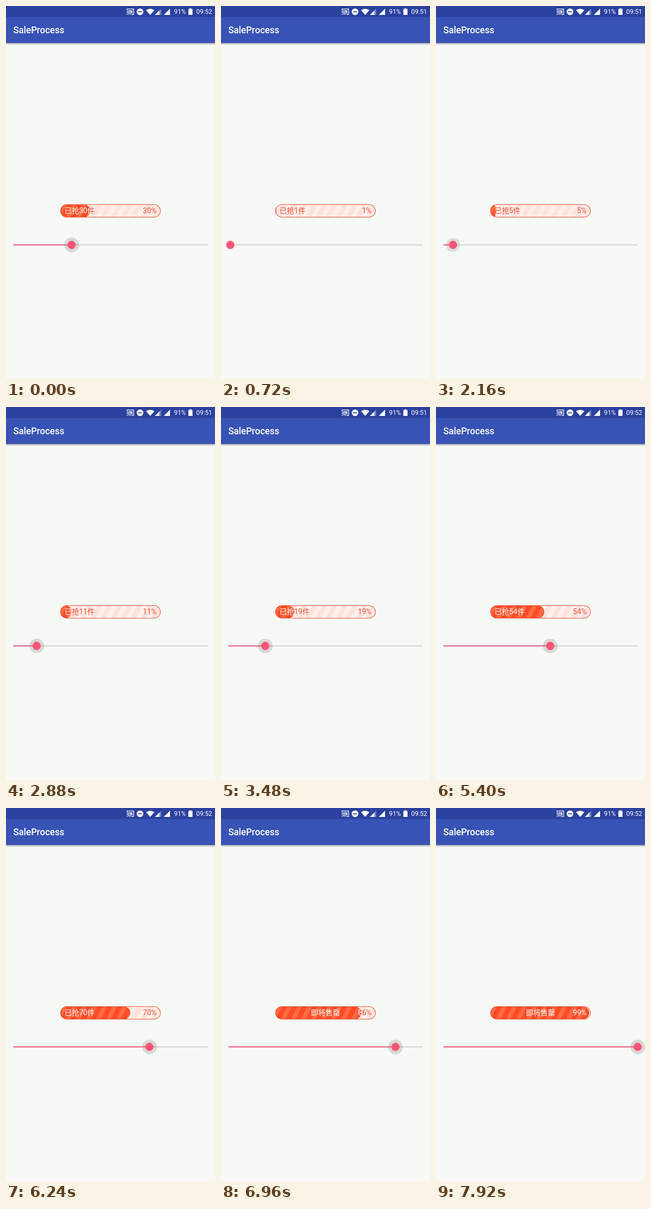
Write an HTML page with a canvas that moves like this. It is 400 px wide and 711 px high and loops after 8000 ms.

```html
<!DOCTYPE html>
<html lang="zh-CN">
<head>
<meta charset="utf-8">
<title>SaleProcess</title>
<style>
html, body { margin: 0; width: 100%; height: 100%; overflow: hidden; background: #f7f9f7; }
canvas { display: block; }
</style>
</head>
<body>
<canvas id="stage" width="400" height="711"></canvas>
<script>
const ctx = document.getElementById('stage').getContext('2d');
const LOOP = 8000, STEP = 120;
const FONT = 'Roboto, "Noto Sans CJK SC", "Noto Sans CJK", sans-serif';
const STATUS = '#2b419f', RED = '#ee5136', PINK = '#ff5378';
const BAR = { x: 104, y: 378, w: 192, h: 25 };
const TRACK = { x: 14, y: 455.4, w: 372 };

// [time in ms, percent] of the finger dragging the slider
const DRAG = [[1800, 1], [2160, 5], [2520, 8], [3360, 17], [3480, 19], [4200, 30], [4320, 32.6],
  [5400, 54.6], [6720, 79], [6960, 86], [7560, 96], [7920, 99.6]];

const clamp = (v, lo = 0, hi = 1) => Math.min(hi, Math.max(lo, v));

function percentAt(t) {
  if (t < 720) return 30;
  if (t <= DRAG[0][0]) return DRAG[0][1];
  const i = DRAG.findIndex(([time]) => time >= t);
  const [t0, p0] = DRAG[i - 1], [t1, p1] = DRAG[i];
  return p0 + (p1 - p0) * (t - t0) / (t1 - t0);
}

function rect(x, y, w, h, color) {
  ctx.fillStyle = color;
  ctx.fillRect(x, y, w, h);
}

function disc(x, y, r, color) {
  ctx.fillStyle = color;
  ctx.beginPath();
  ctx.arc(x, y, r, 0, 7);
  ctx.fill();
}

function shape(path, color = '#fff') {
  ctx.fillStyle = color;
  ctx.fill(new Path2D(path));
}

function text(str, x, y, size, color, align = 'left', weight = 400) {
  ctx.font = `${weight} ${size}px ${FONT}`;
  ctx.textAlign = align;
  ctx.fillStyle = color;
  ctx.fillText(str, x, y);
}

function pill(x, y, w, h) {
  const path = new Path2D();
  path.roundRect(x, y, w, h, h / 2);
  return path;
}

function clipped(path, draw) {
  ctx.save();
  ctx.clip(path);
  draw();
  ctx.restore();
}

function drawHeader(clock) {
  rect(0, 0, 400, 21, STATUS);
  rect(0, 21, 400, 49.5, '#3853b6');
  const shadow = ctx.createLinearGradient(0, 70, 0, 75);
  shadow.addColorStop(0, 'rgba(0,0,0,.3)');
  shadow.addColorStop(1, 'rgba(0,0,0,0)');
  rect(0, 70, 400, 5, shadow);
  text('SaleProcess', 14, 52.4, 17.5, '#fff', 'left', 500);

  // cast
  ctx.strokeStyle = '#fff';
  ctx.lineWidth = 1.3;
  ctx.stroke(new Path2D('M231.7 8V5.7H244.3V16.2H240'));
  ctx.stroke(new Path2D('M231 9.3A7 7 0 0 1 238 16.5M231 12A4.5 4.5 0 0 1 235.5 16.5'));
  shape('M231 14.5A2 2 0 0 1 233 16.5H231Z');
  shape('M234 8H242V14H239.5A9 9 0 0 0 234 8.5Z', 'rgba(255,255,255,.75)');

  // do not disturb
  disc(256.5, 11, 6.3, '#fff');
  rect(253, 10.2, 7, 1.7, STATUS);

  // wifi and signal
  shape('M268 8Q276 2.4 284 8L276 17Z');
  shape('M297 5V17H285Z', 'rgba(255,255,255,.35)');
  shape('M293.5 8.5V17H285Z');
  shape('M314 5V17H302Z');

  text('91%', 321.5, 15.2, 12.25, '#fff');
  shape('M351 4.5H355V5.5H357V17H349V5.5H351Z');
  rect(349, 5.5, 8, 1, 'rgba(43,65,159,.35)');
  text(clock, 394.5, 15.2, 12.25, '#fff', 'right');
}

function stripes(color) {
  const { x, y, w, h } = BAR, slant = 13, gap = 19.2, width = 9;
  for (let s = x - 9; s < x + w + slant; s += gap)
    shape(`M${s} ${y + h}l${slant} ${-h}h${width}l${-slant} ${h}Z`, color);
}

function drawBar(percent) {
  const { x, y, w, h } = BAR;
  const nearlyOut = percent > 80;
  const labels = color => {
    if (!nearlyOut) text(`已抢${percent}件`, 112, 395.3, 14, color);
    text(percent + '%', 288, 395.3, 14, color, 'right');
  };

  clipped(pill(x, y, w, h), () => {
    rect(x, y, w, h, '#ffe2dc');
    stripes('#ffefeb');
    labels(RED);
    const fill = new Path2D();
    fill.roundRect(x, y + .5, (w - 1) * percent / 100, h - 1, 12);
    clipped(fill, () => {
      rect(x, y, w, h, '#ff4b25');
      stripes('#ff6a44');
      labels('#fff');
    });
    if (nearlyOut) text('即将售罄', 200, 395.3, 14, '#fff', 'center');
  });
  ctx.strokeStyle = RED;
  ctx.lineWidth = 1.1;
  ctx.stroke(pill(x + .5, y + .5, w - 1, h - 1));
}

function drawSlider(percent, press) {
  const { x, y, w } = TRACK, thumb = x + w * percent / 100;
  disc(thumb, y, 8 + 6 * press, `rgba(0,0,0,${.13 * press})`);
  rect(x, y - .9, w, 1.8, 'rgba(0,0,0,.17)');
  rect(x, y - .9, thumb - x, 1.8, '#ee4f76');
  disc(thumb, y, 7.8, PINK);
}

function draw(now) {
  const t = Math.floor(now % LOOP / STEP) * STEP;
  const value = percentAt(t);
  rect(0, 0, 400, 711, '#f7f9f7');
  drawHeader(t >= 720 && t < 4320 ? '09:51' : '09:52');
  drawBar(Math.floor(value + 1e-6));
  drawSlider(Math.round(value), t < 720 ? 1 : clamp((t - 1860) / 350));
  requestAnimationFrame(draw);
}
requestAnimationFrame(draw);
</script>
</body>
</html>
```
